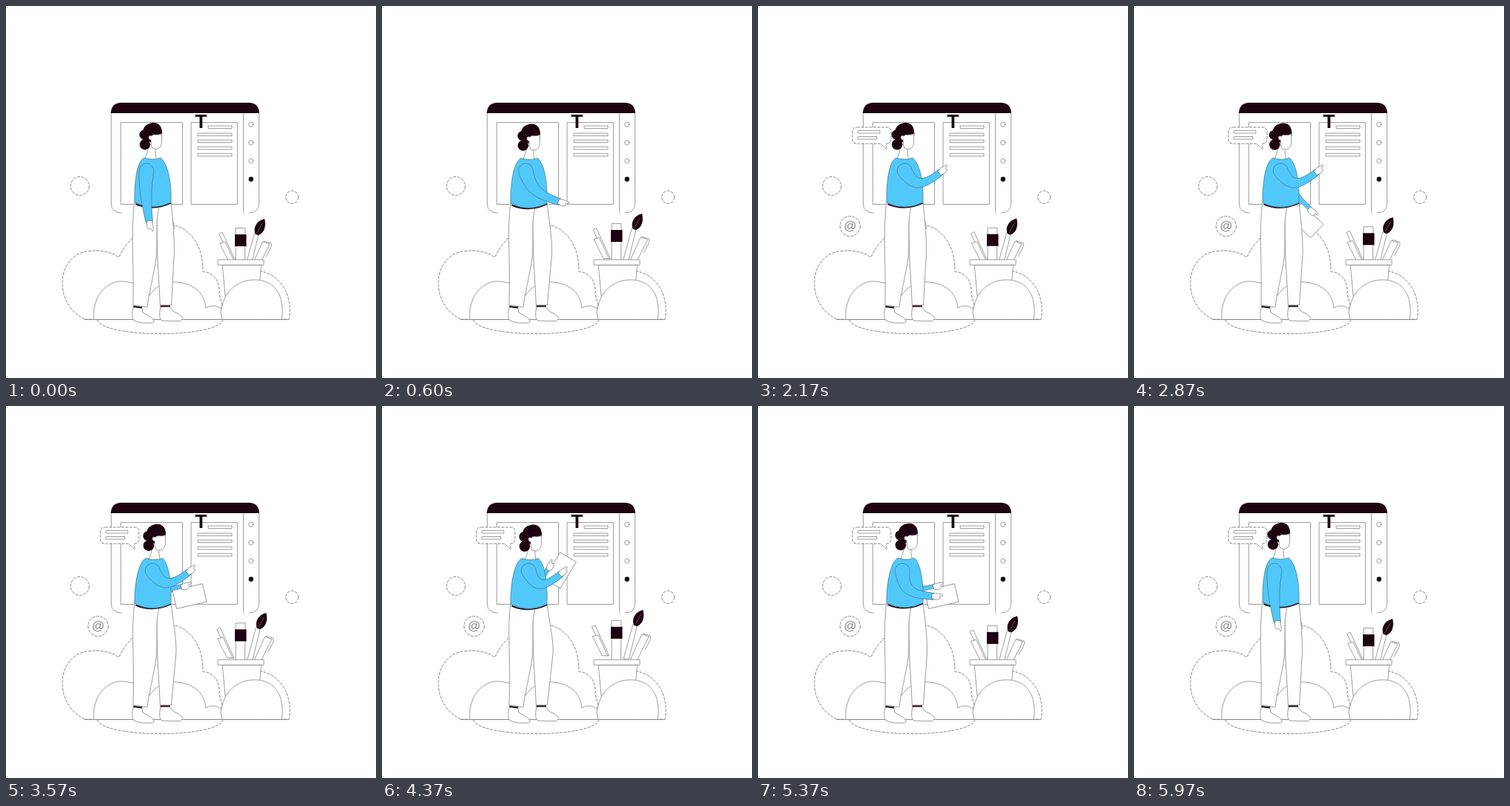
Write an HTML page that moves like this. It is 498 by 500 pixels and loops after 6.01 s.

```html
<!DOCTYPE html>
<html lang="en">
<head>
<meta charset="utf-8">
<title>Designer at the board</title>
<style>
  html, body { margin: 0; width: 100%; height: 100%; overflow: hidden; background: #fff; }
  svg { display: block; width: 100%; height: 100%; }
  .line { fill: #fff; stroke: #858585; stroke-width: .8; stroke-linejoin: round; stroke-linecap: round; }
  .open { fill: none; }
  .dots { fill: #fff; stroke: #555; stroke-width: .7; stroke-dasharray: 4 1.5; }
  .dark { fill: #1d0312; stroke: none; }
  .cuff { fill: none; stroke: #1d0312; stroke-width: 2; }
  .blue { fill: #50c8fa; stroke: #4b7d92; stroke-width: .8; stroke-linejoin: round; }
  text { font-family: "Liberation Sans", Arial, sans-serif; font-weight: bold; text-anchor: middle; }
</style>
</head>
<body>
<svg viewBox="0 0 498 500" preserveAspectRatio="none">
  <circle class="dots" cx="99.500" cy="242" r="12.500"/>
  <circle class="dots" cx="385" cy="257" r="8.500"/>

  <g id="clouds">
    <path class="dots" d="M106 421C70 405 65 350 98 333C116 326 138 328 152 338C162 314 185 294 216 293C250 295 266 326 265 357C280 358 288 370 287 387L296 421Z"/>
    <path class="dots" d="M340 421V356C366 359 387 385 381 421Z"/>
  </g>

  <g id="board">
    <path d="M141 143V265Q141 278 155 278H327Q341 278 341 265V143Z" fill="#fff"/>
    <path class="line open" d="M155 278Q141.500 278 141.500 265V143M340.500 143V265Q340.500 278 327 278"/>
    <path class="dark" d="M141 144Q142 130 155 130H327Q340 130 341 144Z"/>
    <path class="line" d="M319.500 144V278M155 156.500H237.500V266.500H155ZM249.500 156.500H311.500V266.500H249.500Z"/>
    <g id="rows"></g>
    <text x="262.500" y="164" font-size="26" fill="#1d0312">T</text>
    <g id="buttons"></g>
  </g>

  <g id="tools">
    <g id="pencil">
      <path class="line" d="M287 306L291 304L310 345H305Z"/>
      <path class="line" d="M288 319L295 317L308 345H301Z"/>
    </g>
    <g id="brush">
      <path class="line" d="M335 305L340 307L329 352H322Z"/>
      <path class="dark" d="M336 307C332 300 336 289 348 286C350 294 349 304 340 308Z"/>
      <path d="M338 305L345 292" stroke="#8b7c85" stroke-width=".6"/>
    </g>
    <g id="marker">
      <path class="line" d="M309.500 298.500H322L321.500 352H309.500Z"/>
      <path class="dark" d="M308 307H323.500V323H308Z"/>
    </g>
    <g id="pen">
      <path class="line" d="M346 317L355 320L339 352H330Z"/>
      <path class="line open" d="M347 316L357 319Q358 322 356 326L350 337"/>
    </g>
    <path class="line" d="M291.500 348H343.500L339 405H297Z"/>
    <path class="line" d="M285.500 341H347V348H285.500Z"/>
  </g>

  <path class="dots open" d="M123 421C127 447 288 447 292 421"/>
  <path class="line" d="M118 421C116 390 135 370 156 370C178 371 188 382 192 390C200 378 212 371 226 371C253 371 268 388 269 406C274 402 284 402 290 407C294 383 312 368 335 368C362 368 376 390 371 421Z"/>
  <path class="line open" d="M291 421Q288 414 290 405M106 421.500H380"/>

  <g id="at">
    <circle class="dots" r="13.500"/>
    <text y="5" font-size="17" fill="#929292">@</text>
  </g>
  <g id="bubble">
    <path class="dots" d="M133 163H173Q179 163 179 169V179Q179 185 173 185V193L165 185H133Q127 185 127 179V169Q127 163 133 163Z"/>
    <path class="line" d="M135 167.500H164V171H135ZM135 175.500H160V179H135Z"/>
  </g>

  <g id="woman">
    <g id="backArm">
      <path class="blue"/>
      <g>
        <path class="line" d="M-14.500 1.500H26.500V26.500H-14.500Z" transform="rotate(2)"/>
        <path class="line hand"/>
      </g>
    </g>
    <path class="line" d="M208 402C207 412 205 420 210 423L234 423.500C241 421 236 415 228 412Q221 408 220 402Z"/>
    <path class="line" d="M172 402C169 414 169 422 173 423C180 426 190 427 198 425.500C202 421 192 417 184 412L183 404Z"/>
    <path id="rightLeg" class="line"/>
    <path id="leftLeg" class="line"/>
    <path class="cuff" d="M171.500 404L183 405.500M208 403.500H221"/>
    <path id="belt" class="cuff"/>
    <g id="head">
      <path class="line" d="M192 185C191 196 189 201 185 209H204C201 203 201 198 201 191Z"/>
      <path class="dark" d="M185 177C181 163 190 157 199 157C207 157 211 164 210 174L196 184Z"/>
      <circle class="dark" cx="186" cy="173" r="6.500"/>
      <circle class="dark" cx="187" cy="186" r="7.200"/>
      <circle class="dark" cx="190" cy="179" r="5"/>
      <path class="line" d="M195 180C190 179 192 172 196 175C198 171 204 175 209.500 171.500V183C209 192 202 194 197 191Q195 188 195 180Z"/>
    </g>
    <path id="torso" class="blue"/>
    <g id="frontArm"><path class="blue"/><g><path class="line hand"/></g></g>
  </g>
</svg>
<script>
const LOOP = 6010;
const $ = id => document.getElementById(id);
const put = (node, name, value) => node.setAttribute(name, value);
const mix = (a, b, k) => a + (b - a) * k;
const ease = (t, from, to) => (1 - Math.cos(Math.PI * Math.max(0, Math.min(1, (t - from) / (to - from))))) / 2;
const hump = (t, from, peak, to) => ease(t, from, peak) - ease(t, peak, to);

// Arm poses: angles of the upper arm and forearm, and the visible forearm length.
const FRONT = {
  rest: { upper: 94, fore: 81, reach: 39 },
  point: { upper: 57, fore: -37, reach: 40 },
  read: { upper: 65, fore: -38, reach: 39 },
  hold: { upper: 86, fore: 5, reach: 40 }
};
const BACK = {
  rest: { upper: 83, fore: 76, reach: 39 },
  hold: { upper: 84, fore: -15, reach: 29 },
  read: { upper: 90, fore: -61, reach: 37 }
};

// Runs through moves, each with a pose and the span in which it is reached.
function armPose(poses, moves, t) {
  const now = { ...poses.rest };
  for (const [pose, from, to] of moves)
    for (const part in now) now[part] = mix(now[part], poses[pose][part], ease(t, from, to));
  return now;
}

const step = ([x, y], deg, len) => [x + Math.cos(deg * Math.PI / 180) * len, y + Math.sin(deg * Math.PI / 180) * len];
const toward = (a, b, k) => [mix(a[0], b[0], k), mix(a[1], b[1], k)];

function drawArm(id, shoulder, { upper, fore, reach }, [top, middle, end]) {
  const elbow = step(shoulder, upper, 31), wrist = step(elbow, fore, reach);
  const side = turn => [step(shoulder, upper + turn, top),
    step(elbow, (upper + fore) / 2 + turn, middle), step(wrist, fore + turn, end)];
  const [a, b, c] = side(-90), [d, e, f] = side(90);
  const bend = (p, q, r) => `C${toward(p, q, .85)} ${toward(r, q, .8)} ${r}`;
  const [sleeve, hand] = $(id).children;
  put(sleeve, 'd', `M${a}${bend(a, b, c)}L${f}${bend(f, e, d)}A${top} ${top} 0 0 1 ${a}`);
  put(hand, 'transform', `translate(${wrist}) rotate(${fore})`);
}

function drawBody(lean, lift) {
  const c = lean / 2, y = 204 + lift, hip = 264 + 3 * lift, knee = 226.5 + 4.5 * lift;
  put($('head'), 'transform', `translate(${lean} ${3 * lift})`);
  put($('torso'), 'd', `M${186 + c} ${y}C${174 + c} 210 173 245 173 ${hip}Q197 ${hip + 12} 222 ${hip}C223 240 ${219 + c / 3} 213 ${208 + c} ${y}Q${198 + c} ${y + 4} ${186 + c} ${y}Z`);
  put($('belt'), 'd', `M174.500 ${hip + 2}Q197 ${hip + 12} 222 ${hip + .5}`);
  put($('rightLeg'), 'd', `M203 ${hip}L222 ${hip}C225 288 ${knee} 310 ${knee} 331L222.500 402H207.500L203.500 330Z`);
  put($('leftLeg'), 'd', `M173 ${hip}C168 300 ${172 + 2 * lift} 340 171 402L190 404.500C193 380 202 350 203 330V290L206 ${hip + 4}Z`);
}

function render(t) {
  const lift = hump(t, 0, 1200, 2300) + .85 * hump(t, 2300, 4400, 5960);
  const lean = 6 * hump(t, 0, 1230, 2300) + 5 * (ease(t, 2300, 3500) - ease(t, 5350, 5960));
  drawBody(lean, lift);

  const front = armPose(FRONT, [['point', 0, 1150], ['read', 3600, 4370], ['hold', 4500, 5300], ['rest', 5370, 5960]], t);
  const back = armPose(BACK, [['hold', 2450, 3450], ['read', 3600, 4370], ['hold', 4500, 5300], ['rest', 5370, 5960]], t);
  // The shoulder rolls forward as the forearm rises.
  drawArm('frontArm', [189 + .07 * (81 - front.fore), 221.5], front, [10, 7.5, 4.5]);
  drawArm('backArm', [207, 220], back, [5, 5, 4.2]);

  const shift = (id, x, y) => put($(id), 'transform', `translate(${x * lift} ${y * lift})`);
  shift('pencil', -5, -11);
  shift('marker', 0, -12);
  shift('brush', 4, -14);
  shift('pen', 5, -12);

  const sway = 25 - 31 * ease(t, 700, 1230) + 6 * ease(t, 1230, 1730);
  put($('bubble'), 'transform', `translate(172 175) rotate(${sway}) scale(${ease(t, 700, 1150)}) translate(-172 -175)`);
  put($('at'), 'transform', `translate(124 296) scale(${ease(t, 750, 1180)})`);
}

const row = (x, y) => `<path class="line" d="M${x} ${y}H304V${y + 3.5}H${x}Z"/>`;
$('rows').innerHTML = row(272.5, 161) + [0, 1, 2, 3].map(i => row(258.5, 171 + i * 9.1)).join('');
$('buttons').innerHTML = [0, 1, 2, 3].map(i =>
  `<circle class="${i < 3 ? 'line' : 'dark'}" cx="329.800" cy="${159 + i * 24.6}" r="3.200"/>`).join('');
document.querySelectorAll('.hand').forEach(hand =>
  put(hand, 'd', 'M-2 -3.500C2 -4 4 -5 7 -4L12 -3.500Q13 -2 11 -1.500L8 -.5L9 2Q6 5 2 4L-2 3Z'));

const start = performance.now();
function tick() {
  render((performance.now() - start) % LOOP);
  requestAnimationFrame(tick);
}
tick();
</script>
</body>
</html>
```
